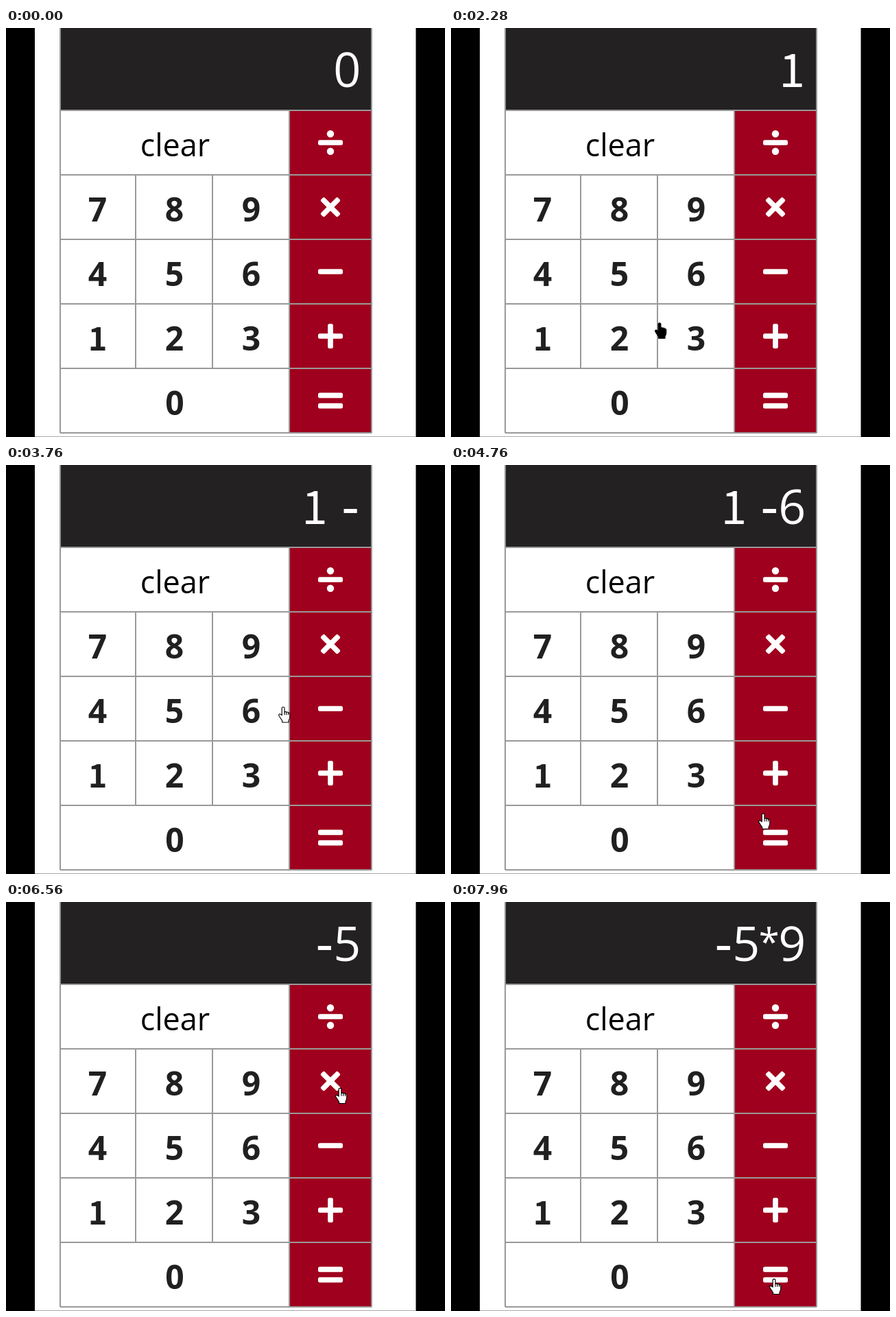
Write an HTML page that moves like this. It is 640 px wide and 596 px high and loops after 8000 ms.

```html
<!DOCTYPE html>
<html lang="en">
<head>
<meta charset="utf-8">
<title>Calculator</title>
<style>
  html, body { margin: 0; width: 100%; height: 100%; overflow: hidden; background: #000; }
  svg { display: block; width: 640px; height: 596px; }
  text { font-family: "Open Sans", "Noto Sans", sans-serif; text-anchor: middle; }
  text.one { font-family: "Noto Sans CJK JP", "Noto Sans CJK SC", "Noto Sans CJK", "Open Sans", sans-serif; }
  #keys text { font-size: 48px; font-weight: 700; fill: #212021; }
  #keys text.one { font-size: 47px; }
  #keys text.clear { font-size: 45px; font-weight: 400; fill: #000; }
  #screen, #ops { fill: #fff; }
  #grid { fill: none; stroke: #999; stroke-width: 2; }
  #hand { stroke: #000; stroke-width: 1.2; stroke-linejoin: round; }
</style>
</head>
<body>
<svg viewBox="0 0 640 596">
  <rect width="640" height="596" fill="#000"/>
  <rect x="42" width="555.5" height="596" fill="#fff"/>
  <rect x="42" y="595" width="555.5" height="1" fill="#aaa"/>
  <rect x="79" width="454" height="120" fill="#232122"/>
  <rect x="413" y="120" width="120" height="470" fill="#9f001d"/>
  <path id="grid"/>
  <g id="keys"></g>
  <g id="ops"></g>
  <g id="screen"></g>
  <g id="hand">
    <path d="M-2 1.5Q0-.8 2 1.5V8Q4 6.8 5 8.4Q7 7.5 8 9.2Q10 8.8 10.3 11V16Q10 19 8.5 21V24H-1.5V21.5Q-4 18-6.5 14Q-7.5 11.5-5.5 11Q-4 11-2 13Z"/>
    <path fill="none" d="M2 8v4.5M5 8.4v4.1M8 9.2v3.3"/>
  </g>
</svg>
<script>
const $ = id => document.getElementById(id);
const LOOP = 8000, STEP = 40, ROW = 94, COL = 112;

// Grid lines
const rows = [0, 1, 2, 3, 4, 5].map(i => `M79 ${120 + ROW * i}H533`).join('');
$('grid').setAttribute('d', `M79 0V590M533 0V590M413 120V590M189 214V496M301 214V496${rows}`);

// Keys
const label = (s, x, y, attrs = '') =>
  `<text class="${s === '1' ? 'one' : s}" x="${x}" y="${y}" ${attrs}>${s}</text>`;
const pad = ['789', '456', '123'].map((row, r) =>
  [...row].map((s, c) => label(s, 133.5 + COL * c, 281.5 + ROW * r)).join(''));
$('keys').innerHTML = label('clear', 246.5, 187) + pad.join('') + label('0', 246, 563.5);

// Operator icons
const bar = (y, turn = 0, w = 36) =>
  `<rect x="${-w / 2}" y="${y - 3.85}" width="${w}" height="7.7" rx="2.5" transform="rotate(${turn})"/>`;
const dot = y => `<circle cy="${y}" r="5.2"/>`;
$('ops').innerHTML = [
  bar(0) + dot(-12.8) + dot(12.8),
  bar(0, 45, 35) + bar(0, -45, 35),
  bar(0),
  bar(0) + bar(0, 90),
  bar(-7.7) + bar(7.7)
].map((icon, i) => `<g transform="translate(473 ${167 + ROW * i})">${icon}</g>`).join('');

// Display glyphs, set from the right edge
const digit = { w: 37.7, size: 70, y: 86 };
const glyphs = {
  ' ': { ...digit, w: 19.2 },
  '-': { w: 28, size: 80, y: 88.5 },
  '*': { w: 29.2, size: 54, y: 78 },
  '1': { ...digit, size: 68 }
};
let shown;
function show(str) {
  if (str === shown) return;
  shown = str;
  let right = 516, out = '';
  for (const c of [...str].reverse()) {
    const { w, size, y } = glyphs[c] || digit;
    out += label(c, right - w / 2, y, `font-size="${size}"`);
    right -= w;
  }
  $('screen').innerHTML = out;
}

// Each move of the fingertip, and the press that may follow it
const origin = { x: 575, y: 600 };
const moves = [
  { go: 600, end: 1400, x: 136, y: 452, press: 1800, text: '1' },
  { go: 1950, end: 3040, x: 463, y: 350, press: 3480, text: '1 -' },
  { go: 3600, end: 4040, x: 364, y: 358, press: 4240, text: '1 -6' },
  { go: 4280, end: 4900, x: 460, y: 530, press: 5120, text: '-5' },
  { go: 5400, end: 5640, x: 454, y: 527 },
  { go: 5920, end: 6560, x: 487, y: 271, press: 6920, text: '-5*' },
  { go: 6960, end: 7240, x: 362, y: 262, press: 7320, text: '-5*9' },
  { go: 7360, end: 7720, x: 485, y: 546 },
  { go: 7760, end: 7960, x: 471, y: 549 }
];
const easeOut = k => k * (2 - k);
const smooth = k => k * k * (3 - 2 * k);

function draw(now) {
  const t = Math.floor(Math.max(0, now - start) % LOOP / STEP) * STEP;
  let { x, y } = origin, text = '0';
  for (const m of moves) {
    const k = Math.min(1, Math.max(0, (t - m.go) / (m.end - m.go)));
    x += (m.x - x) * easeOut(k);
    y += (m.y - y) * smooth(k);
    if (t >= m.press) text = m.text;
  }
  show(text);
  const hand = $('hand');
  hand.setAttribute('transform', `translate(${x.toFixed(1)} ${y.toFixed(1)}) scale(.94)`);
  hand.setAttribute('fill', t < moves[1].end ? '#000' : '#fff');
  requestAnimationFrame(draw);
}
const start = performance.now();
draw(start);
</script>
</body>
</html>
```
